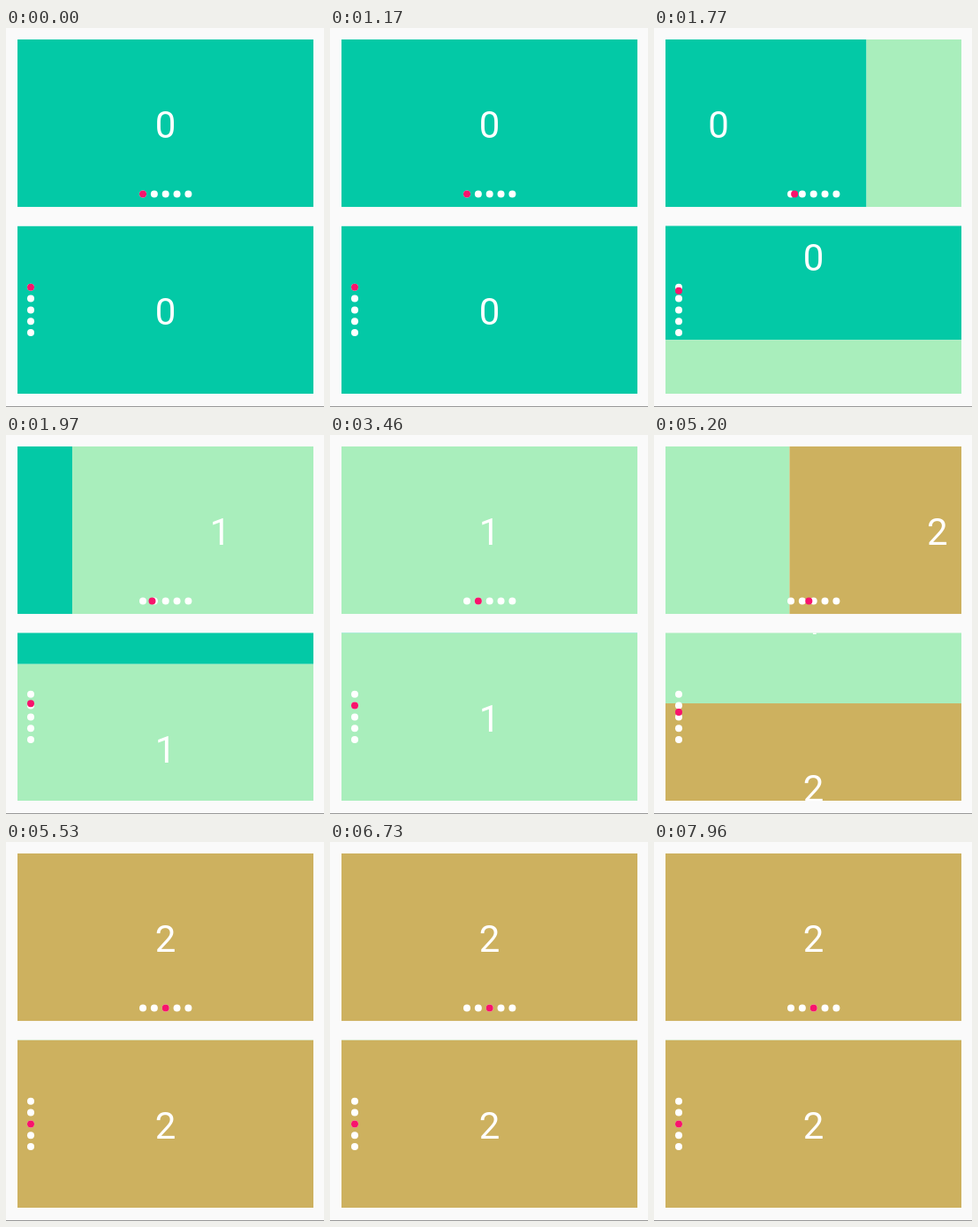
These frames come from a looping animation (360 px wide and 428 px high, 8 s). An HTML page:

```html
<!DOCTYPE html>
<html lang="en">
<head>
<meta charset="utf-8">
<title>Pager with dots</title>
<style>
  html, body { margin: 0; width: 100%; height: 100%; overflow: hidden; background: #fafafa; }
  svg { display: block; width: 100vw; height: 100vh; }
  text { font: 42px Roboto, sans-serif; fill: #fff; text-anchor: middle; }
</style>
</head>
<body>
<svg id="stage" viewBox="0 0 360 428"></svg>
<script>
const NS = 'http://www.w3.org/2000/svg';
const LOOP = 8000, SLIDE = 600, STARTS = [1541, 4870];
const COLORS = ['#03c9a6', '#a9eebc', '#cdb15f'];
const W = 335, H = 189.5, LEFT = 13, GAP = 12.85;
const stage = document.getElementById('stage');

function add(parent, tag, attrs, text) {
  const el = document.createElementNS(NS, tag);
  for (const key in attrs) el.setAttribute(key, attrs[key]);
  if (text !== undefined) el.textContent = text;
  return parent.appendChild(el);
}

function makePager(top, vertical) {
  const view = add(stage, 'svg', { x: LEFT, y: top, width: W, height: H, overflow: 'hidden' });
  const pages = COLORS.map((fill, i) => {
    const page = add(view, 'g', {});
    add(page, 'rect', { width: W, height: H, fill });
    add(page, 'text', { x: W / 2, y: 111.2 }, i);
    return page;
  });
  const spot = i => vertical
    ? { cx: 15, cy: 69.1 + i * GAP }
    : { cx: 142 + i * GAP, cy: 174.8 };
  for (let i = 0; i < 5; i++) add(view, 'circle', { ...spot(i), r: 4, fill: '#fff' });
  const active = add(view, 'circle', { ...spot(0), r: 4, fill: '#f8146c' });

  return pos => {
    pages.forEach((page, i) => {
      const x = vertical ? 0 : (i - pos) * W;
      const y = vertical ? (i - pos) * H : 0;
      page.setAttribute('transform', `translate(${x} ${y})`);
    });
    const { cx, cy } = spot(pos);
    active.setAttribute('cx', cx);
    active.setAttribute('cy', cy);
  };
}

const pagers = [makePager(12.7, false), makePager(223.6, true)];
add(stage, 'rect', { y: 427, width: 360, height: 1, fill: '#999' });

function ease(u) {
  const c = Math.min(1, Math.max(0, u));
  return (1 - Math.cos(Math.PI * c)) / 2;
}

function draw(ms) {
  const t = ms % LOOP;
  const pos = STARTS.reduce((sum, start) => sum + ease((t - start) / SLIDE), 0);
  pagers.forEach(move => move(pos));
}

const begin = performance.now();
function tick() {
  draw(performance.now() - begin);
  requestAnimationFrame(tick);
}
tick();
</script>
</body>
</html>
```
